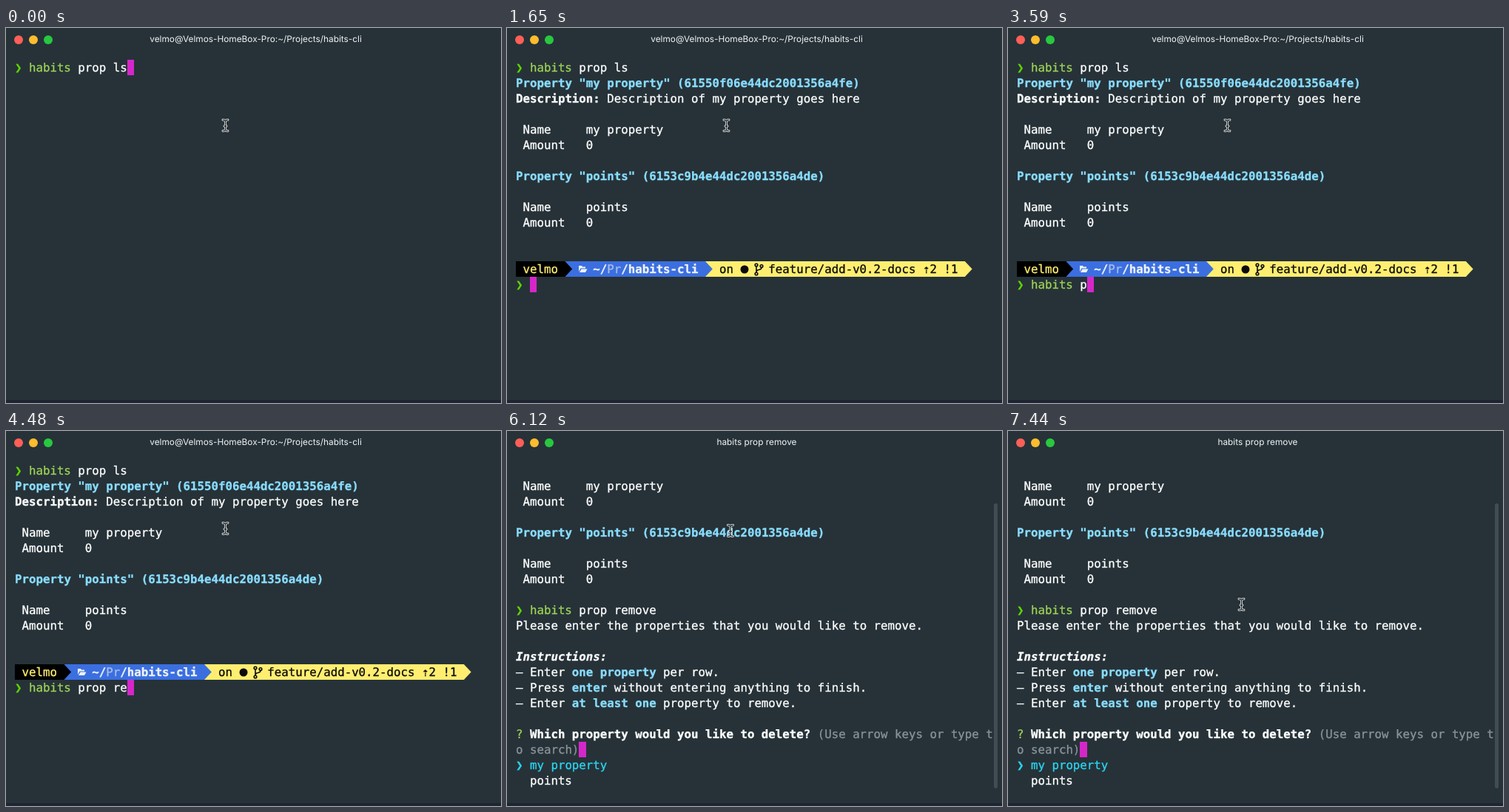
An HTML page that plays this animation: 669 px wide and 508 px high, repeating every 8 s.

```html
<!DOCTYPE html>
<html lang="en">
<head>
<meta charset="utf-8">
<title>habits-cli terminal</title>
<style>
  html, body { margin: 0; width: 100%; height: 100%; overflow: hidden; background: #263238; }
  svg { display: block; width: 100vw; height: 100vh; }
  text { white-space: pre; text-rendering: geometricPrecision; }
  #screen { font: 15.75px "DejaVu Sans Mono", monospace; color: #fff; }
  #screen text { fill: currentColor; stroke: currentColor; stroke-width: .3px; }
  #title { font: 11.85px Inter, sans-serif; fill: #f1f3f4; text-anchor: middle; }
  .b { font-weight: bold; }
  .i { font-style: italic; }
  .sky { color: #89ddff; }
  .lime { color: #9fd356; }
  .arrow { color: #5fd700; }
  .cyan { color: #2bd5f2; }
  .grey { color: #89949a; }
  .ink { color: #0b0b0b; }
  .gold { color: #ffee70; }
  .pale { color: #eef2f6; }
  .dim { color: #a9bde6; }
</style>
</head>
<body>
<svg viewBox="0 0 669 508">
  <rect width="669" height="508" fill="#263238"/>
  <rect y="504" width="669" height="4" fill="#1f2433"/>
  <circle cx="17" cy="16" r="6" fill="#ff5f57"/>
  <circle cx="37" cy="16" r="6" fill="#febc2e"/>
  <circle cx="57" cy="16" r="6" fill="#28c840"/>
  <text id="title" x="337.5" y="19"></text>
  <g id="screen"></g>
  <rect id="bar" x="658" y="98" width="5" height="386" rx="2.5" fill="#414d53"/>
  <g id="mouse" fill="none" stroke-linecap="round">
    <path id="halo" stroke="#fff" stroke-width="2.8"/>
    <path id="beam" stroke="#20282c" stroke-width="1.3"/>
  </g>
</svg>
<script>
const LOOP = 8000, COL = 9.482, LEFT = 12, TOP = 43, ROW = 21;
const USER = 'velmo';
const HOME = USER + '@Velmos-HomeBox-Pro:~/Projects/habits-cli';
const $ = id => document.getElementById(id);
const colX = c => LEFT + c * COL;
const rowY = r => TOP + r * ROW;

// A line is a list of [text, classes] runs.
function line(row, runs, col = 0) {
  return runs.map(([text, cls = '']) => {
    const out = `<text class="${cls}" x="${colX(col).toFixed(2)}" y="${rowY(row) + 16}">${text}</text>`;
    col += text.length;
    return out;
  }).join('');
}

function cursor(row, col) {
  const x = Math.round(colX(col)), end = Math.round(colX(col + 1));
  return `<rect x="${x}" y="${rowY(row)}" width="${end - x}" height="21" fill="#d527c9"/>`;
}

function prompt(row, typed) {
  const done = typed.startsWith('habits');
  return line(row, [['❯', 'arrow'], [' '],
    [done ? 'habits' : typed, done ? 'lime' : ''], [done ? typed.slice(6) : '']]);
}

const typing = (row, typed) => prompt(row, typed) + cursor(row, 2 + typed.length);

const item = (row, name) =>
  line(row, [['Name     ' + name]], 1) + line(row + 1, [['Amount   0']], 1);

const heading = (row, name, id) => line(row, [[`Property "${name}" (${id})`, 'b sky']]);

const points = row => heading(row, 'points', '6153c9b4e44dc2001356a4de') + item(row + 2, 'points');

const listing = prompt(0, 'habits prop ls') +
  heading(1, 'my property', '61550f06e44dc2001356a4fe') +
  line(2, [['Description:', 'b'], [' Description of my property goes here']]) +
  item(4, 'my property') + points(7);

function segment(from, to, color) {
  const y = rowY(13), a = colX(from), b = colX(to);
  return `<path d="M${a} ${y}H${b}l9.8 10.5-9.8 10.5H${a}z" fill="${color}"/>`;
}

function statusBar() {
  const y = rowY(13);
  return segment(27, 64, '#ffee70') + segment(7, 27, '#3b6fe0') + segment(0, 7, '#000') +
    line(13, [[USER, 'gold']], 1) +
    `<path fill="#eef2f6" d="M97 ${y + 14}v-8h4l1 1.5h4v2h-6.5zM98 ${y + 15}l2.5-4.5h8l-2.5 4.5z"/>` +
    line(13, [['~/', 'b pale'], ['Pr', 'dim'], ['/habits-cli', 'b pale']], 11) +
    line(13, [['on', 'ink']], 29) +
    `<circle fill="#0b0b0b" cx="321" cy="${y + 11}" r="5.5"/>` +
    `<g fill="none" stroke="#0b0b0b" stroke-width="1.6" transform="translate(337 ${y})">` +
    '<circle cy="5" r="1.8"/><circle cy="17" r="1.8"/><circle cx="7" cy="6.5" r="1.8"/>' +
    '<path d="M0 7V15M7 8.5Q7 11 3.5 11.5Q0 12 0 15"/></g>' +
    line(13, [['feature/add-v0.2-docs ⇡2 !1', 'ink']], 36);
}

const dot = (x, y) => `<circle fill="#2bd5f2" cx="${x}" cy="${y}" r="1"/>`;

const loading = prompt(0, 'habits prop ls') + dot(15.5, 71) + dot(19.5, 71) + dot(19.5, 74.5) +
  line(1, [['Fetch properties']], 2);

const question = item(1, 'my property') + points(4) + prompt(9, 'habits prop remove') +
  line(10, [['Please enter the properties that you would like to remove.']]) +
  line(12, [['Instructions:', 'b i']]) +
  line(13, [['– Enter '], ['one property', 'b sky'], [' per row.']]) +
  line(14, [['– Press '], ['enter', 'b sky'], [' without entering anything to finish.']]) +
  line(15, [['– Enter '], ['at least one', 'b sky'], [' property to remove.']]) +
  line(17, [['?', 'lime'], [' '], ['Which property would you like to delete?', 'b'],
    [' (Use arrow keys or type t', 'grey']]) +
  line(18, [['o search)', 'grey']]) + cursor(18, 9) +
  line(19, [['❯ my property', 'cyan']]) + line(20, [['points']], 2);

const scenes = [
  [0, HOME, typing(0, 'habits prop ls')],
  [150, 'habits prop ls', prompt(0, 'habits prop ls') + cursor(1, 0)],
  [1500, 'habits prop ls', loading]
];

// Each key is [time, characters typed so far].
const command = 'habits prop remove';
const keys = [[1650, 0], [2850, 2], [3000, 3], [3150, 4], [3290, 6], [3440, 7], [3590, 8],
  [3740, 10], [3890, 11], [4030, 12], [4180, 13], [4480, 14], [4620, 15], [4770, 16], [4920, 18]];
const shell = listing + statusBar();
for (const [at, n] of keys) scenes.push([at, HOME, shell + typing(14, command.slice(0, n))]);

scenes.push(
  [5070, command, listing + prompt(12, command) + cursor(13, 0)],
  [5970, command, question]
);

// Pointer stops: [time, x, y].
const stops = [[0, 296.5, 132], [6120, 302, 135], [6260, 309.5, 140], [6410, 313, 143],
  [6560, 315, 146], [6700, 316, 148], [6850, 317, 150], [7000, 317, 152],
  [7150, 317, 178], [7300, 316, 214], [7440, 315.5, 235]];

const last = (list, t) => list.findLast(entry => entry[0] <= t);

const caret = 'M-3.5-7.5Q0-7.5 0-5Q0-7.5 3.5-7.5M0-5V5M-3.5 7.5Q0 7.5 0 5Q0 7.5 3.5 7.5M-1.5 1H1.5';
$('halo').setAttribute('d', caret);
$('beam').setAttribute('d', caret);

let shown;
function draw(t) {
  const scene = last(scenes, t);
  if (scene !== shown) {
    shown = scene;
    $('title').textContent = scene[1];
    $('screen').innerHTML = scene[2];
    $('bar').style.display = scene[0] >= 5970 ? '' : 'none';
  }
  const [, x, y] = last(stops, t);
  $('mouse').setAttribute('transform', `translate(${x} ${y})`);
}

function tick() {
  draw(performance.now() % LOOP);
  requestAnimationFrame(tick);
}
tick();
</script>
</body>
</html>
```
